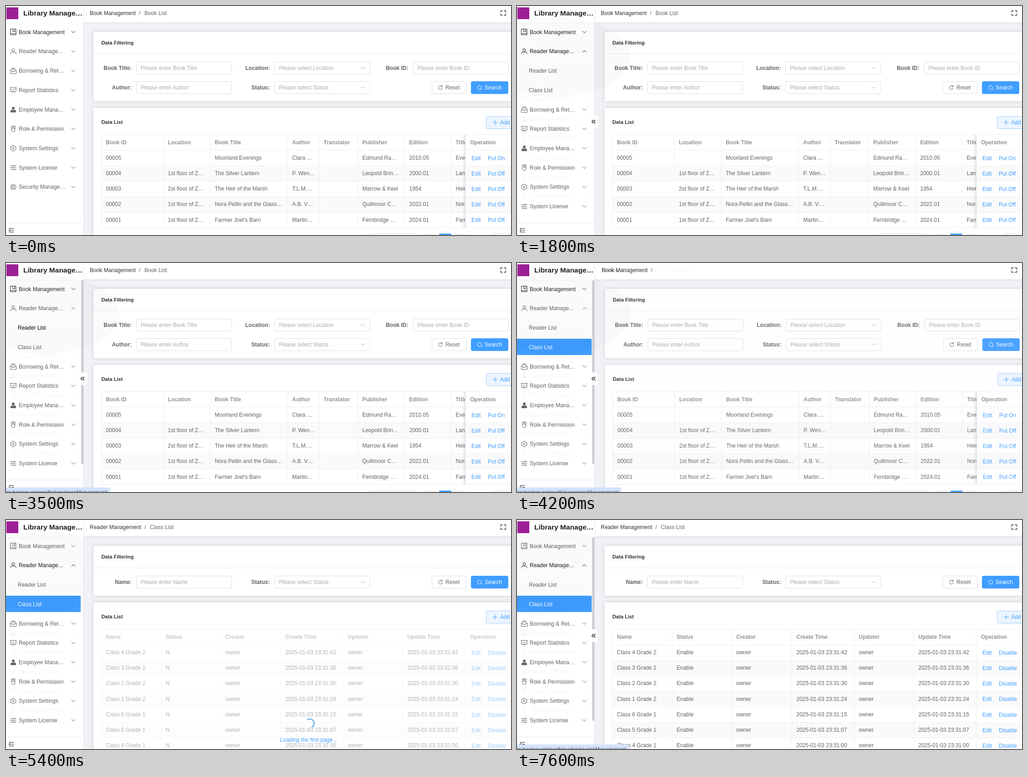
Recreate the animation shown at these times as an HTML page. Size 1109 by 505 pixels, loop 8 s.

```html
<!DOCTYPE html>
<html lang="en">
<head>
<meta charset="utf-8">
<title>Library Management</title>
<style>
html, body { margin: 0; width: 100%; height: 100%; overflow: hidden; background: #f0f2f5; }
#stage { display: block; width: 1109px; height: 505px; font: 12px "Liberation Sans", Arial, sans-serif; }
text { fill: currentColor; white-space: pre; }
.b { font-weight: 700; }
.h { font-weight: 700; font-size: 11.1px; }
.logo { font-weight: 700; font-size: 15.5px; }
.line { fill: none; stroke: currentColor; stroke-linecap: round; stroke-linejoin: round; }
.solid { fill: currentColor; }
.card { fill: #fff; filter: drop-shadow(0 0 4px rgba(0, 0, 0, .14)); }
.url { font: 11px "Open Sans", "Noto Sans", sans-serif; }

/* 1% of the loop is 80 ms */
.step, .move { animation: 8s linear infinite; }
.step { animation-timing-function: step-end; }

.m-book { animation-name: m-book; }
@keyframes m-book { 0% { color: #26272a } 56.25%, 100% { color: #606266 } }
.m-reader { animation-name: m-reader; }
@keyframes m-reader {
  0%, 26.25% { color: #606266 } 13.75%, 56.25%, 100% { color: #1a1b1d } }
.m-list { animation-name: m-list; }
@keyframes m-list { 0%, 46.25%, 100% { color: #606266 } 30% { color: #000 } }
.m-class { animation-name: m-class; }
@keyframes m-class { 0% { color: #606266 } 46.25% { color: #000 } 51.25%, 100% { color: #fff } }
.active { animation-name: active; }
@keyframes active { 0% { opacity: 0 } 51.25%, 100% { opacity: 1 } }

.slide { animation-name: slide; }
@keyframes slide {
  0%, 16.8% { transform: translateY(0); animation-timing-function: ease-in-out }
  21.8%, 100% { transform: translateY(85.44px) } }
.flip { animation-name: flip; }
@keyframes flip {
  0%, 16.8% { transform: rotate(0deg); animation-timing-function: ease-in-out }
  21.8%, 100% { transform: rotate(180deg) } }
.trace { animation-name: trace; }
@keyframes trace { 0% { opacity: 0 } 18.75%, 100% { opacity: .06 } }
.blob { animation-name: blob; }
@keyframes blob { 0% { opacity: 0 } 13.75%, 100% { opacity: 1 } }

.fold { animation-name: fold; }
@keyframes fold {
  0%, 11.2% { opacity: 0 } 11.25%, 59.9% { opacity: 1 } 60% { opacity: .5 }
  61.25%, 87.4% { opacity: 0 } 91.25%, 100% { opacity: 1 } }
.bar { animation-name: bar; }
@keyframes bar {
  0%, 29.5% { opacity: 0 } 32.5%, 59.9% { opacity: 1 } 60% { opacity: .5 }
  61.25%, 87.4% { opacity: 0 } 91.25%, 100% { opacity: 1 } }
.u-reader { animation-name: u-reader; }
@keyframes u-reader { 0%, 43.75% { opacity: 0 } 30%, 95%, 100% { opacity: 1 } }
.u-class { animation-name: u-class; }
@keyframes u-class { 0%, 60%, 95%, 100% { opacity: 0 } 43.75%, 87.5% { opacity: 1 } }

.c-old { animation-name: c-old; }
@keyframes c-old {
  0% { opacity: 1; transform: none } 51.25% { opacity: 1; transform: translateX(1px) }
  52.5% { opacity: 1; transform: translateX(2px) } 56.25%, 100% { opacity: 0; transform: none } }
.c-leaf { animation-name: c-leaf; }
@keyframes c-leaf {
  0% { opacity: 1; transform: none } 51.25% { opacity: .8; transform: translateX(-118px) }
  52.5% { opacity: .5; transform: translateX(-117px) } 56.25%, 100% { opacity: 0; transform: none } }
.c-new { animation-name: c-new; }
@keyframes c-new {
  0% { opacity: 0; transform: translateX(16px) } 52.5% { opacity: .05; transform: translateX(16px) }
  56.25%, 100% { opacity: 1; transform: none } }

.books { animation-name: books; }
@keyframes books {
  0% { opacity: 1; transform: none } 51.25% { opacity: .98; transform: translateX(.4px) }
  52.5% { opacity: .93; transform: translateX(.9px) } 56.25%, 100% { opacity: 0; transform: none } }
.foot { animation-name: foot; }
@keyframes foot { 0%, 65%, 100% { opacity: 0 } 56.25% { opacity: 1 } }
.classes { animation-name: classes; }
@keyframes classes {
  0%, 63.3% { opacity: 0; transform: translateX(-26px); animation-timing-function: ease-in-out }
  67.2%, 100% { opacity: 1; transform: none } }
.mask { animation-name: mask; }
@keyframes mask { 0%, 68.75% { opacity: 1 } 70%, 100% { opacity: 0 } }
.spin { animation-name: spin; }
@keyframes spin { 0%, 62.5% { transform: rotate(-180deg) } 72.5%, 100% { transform: rotate(180deg) } }
.pending { animation-name: pending; }
@keyframes pending { 0% { opacity: 1 } 77.5%, 100% { opacity: 0 } }
.ready { animation-name: ready; }
@keyframes ready { 0% { opacity: 0 } 77.5%, 100% { opacity: 1 } }
</style>
</head>
<body>
<svg id="stage" viewBox="0 0 1109 505"></svg>
<script>
const BLUE = '#409eff', GREY = '#606266', SOFT = '#909399', EDGE = '#ebeef5';

// y is the vertical middle of the text
const text = (x, y, s, color = 'inherit', cls = '', anchor = 'start') =>
  `<text x="${x}" y="${y + 4.3}" class="${cls}" text-anchor="${anchor}" style="color:${color}">${s}</text>`;
const rect = (x, y, w, h, fill, extra = '') =>
  `<rect x="${x}" y="${y}" width="${w}" height="${h}" fill="${fill}" ${extra}/>`;
const group = (cls, body, extra = '') => `<g class="${cls}" ${extra}>${body}</g>`;
const at = (x, y, body) => group('', body, `transform="translate(${x} ${y})"`);
const path = (d, color = 'inherit', width = 1, cls = '') =>
  `<path class="line ${cls}" d="${d}" style="color:${color}" stroke-width="${width}"/>`;
const hline = (x, y, w, color = EDGE) => rect(x, y, w, 1, color);
const vline = (x, y, h, color = EDGE) => rect(x, y, 1, h, color);
const disc = (r, x = 0, y = 0) => `M${x - r} ${y}a${r} ${r} 0 1 0 ${2 * r} 0a${r} ${r} 0 1 0 ${-2 * r} 0`;
const DOWN = 'M-4-2L0 2L4-2';

// ---- sidebar ----
const MENU = [
  ['Book Management', 'M-6-6.5H6V6H-6ZM-6 3.5H6M-1-6.5V0L1.2-1.8L3.4 0V-6.5'],
  ['Reader Manage…', disc(3, 0, -3) + 'M-6 6V4.5Q-6 1.5-3 1.5H3Q6 1.5 6 4.5V6'],
  ['Borrowing &amp; Ret…', 'M-6.5 6V-1L-4-3.5H4L6.5-1V6ZM-6.5 0H-2.5V2H2.5V0H6.5M-4-5.5H4'],
  ['Report Statistics', 'M-7-5.5H7M-6-5.5V3H6V-5.5M-3 6L-1 3M3 6L1 3M-3 0L-1-2L1-.5L3-3'],
  ['Employee Mana…', disc(2.6, 0, -3) + 'M-5.5 5.5V4Q-5.5 1-3 1H-1L0 3L1 1H3Q5.5 1 5.5 4V5.5Z', 'solid'],
  ['Role &amp; Permission', disc(4, 0, 2.5) + 'M-4 0V-6H4V0M-1.5-6V-2M1.5-6V-2'],
  ['System Settings', 'M-2-6H2L3-4L6-3L5.5 0L6 3L3 4L2 6H-2L-3 4L-6 3L-5.5 0L-6-3L-3-4Z' + disc(2)],
  ['System License', 'M-6-4H6M-6 0H6M-6 4H6M2-5.5v3M-3-1.5v3M2 2.5v3'],
  ['Security Manage…', disc(6) + disc(3) + 'M-4-4L-2-2M4-4L2-2M-4 4L-2 2M4 4L2 2'],
];
const menuY = i => 57.4 + 42.72 * i;
const item = (i, cls = '', arrow = '') => {
  const [name, icon, look] = MENU[i], y = menuY(i);
  return group(cls, at(16, y, path(icon, 'inherit', 1, look)) + text(28, y, name)
    + at(148, y, path(DOWN, 'inherit', 1, arrow)), `style="color:${GREY}"`);
};
const items = from => MENU.map((_, i) => i >= from ? item(i) : '').join('');
const blob = '<ellipse class="step blob" cx="84" cy="113" rx="165" ry="88" fill="#000" fill-opacity=".018"/>';

const sidebar = '<svg width="171" height="505">'
  + rect(0, 0, 170, 505, '#fff') + vline(170, 0, 505, '#e3e6ed')
  + rect(1, 3, 26, 26, '#9c1f96') + hline(0, 38, 166, '#f3f4f8')
  + text(38, 17, 'Library Manage…', '#1d1e1f', 'logo')
  + item(0, 'step m-book') + item(1, 'step m-reader', 'move flip')
  + group('step active', `<path d="M0 167H162Q164 167 164 169V201Q164 203 162 203H0Z" fill="${BLUE}"/>`)
  + group('step m-list', text(26, menuY(2), 'Reader List'))
  + group('step m-class', text(26, menuY(3), 'Class List'))
  + group('move slide', rect(0, 122, 170, 400, '#fff') + items(2))
  + blob + group('step blob', rect(0, 104, 170, 25, '#fff', 'opacity=".3"'))
  + group('step trace', at(0, 20, items(3)))
  + rect(0, 478, 170, 27, '#fff') + hline(0, 478, 166, '#e3e7f2')
  + path('M7 490.5H17M11.5 494.5H17M7 498.5H17M9 492.5L6.5 494.5L9 496.5', '#222', 1.2)
  + '</svg>';

const overlay = group('move bar', rect(165, 38, 5, 405, '#cdced1', 'rx="2.5"'))
  + group('move fold', rect(158, 241, 20, 28, '#fff', 'rx="3"')
    + path('M167.5 251.5L164.5 255L167.5 258.5M171.5 251.5L168.5 255L171.5 258.5', '#111', 1.3));

const status = (cls, w, url) => group('step ' + cls,
  `<path d="M0 495H${w - 4}Q${w} 495 ${w} 499V505H0Z" fill="#d3e3fd"/>`
  + text(w - 6, 505, url, '#474a50', 'url', 'end'));

// ---- top bar ----
const header = rect(171, 0, 938, 37, '#fff') + hline(171, 36, 938, '#dfe3ea')
  + rect(171, 37, 938, 3, '#000', 'opacity=".025"')
  + group('step c-old', text(184, 16, 'Book Management', '#303133') + text(292, 16, '/', GREY))
  + group('step c-leaf', text(304, 16, 'Book List', GREY))
  + group('step c-new', text(184, 16, 'Reader Management', '#303133')
    + text(304, 16, '/', GREY) + text(316, 16, 'Class List', GREY))
  + path('M1086.5 14V10.5H1090M1094 10.5H1097.5V14M1097.5 17.5V20.5H1094M1090 20.5H1086.5V17.5', '#333', 1.3);

// ---- pages ----
const box = (x, y, w, fill = '#fff', stroke = '#dcdfe6') =>
  rect(x + .5, y + .5, w - 1, 27, fill, `rx="3" stroke="${stroke}"`);
const field = (x, y, label, hint, select) => text(x - 10, y + 14, label + ':', GREY, 'b', 'end')
  + box(x, y, 210) + text(x + 10, y + 14, hint, '#a8abb2')
  + (select ? at(x + 194, y + 14, path(DOWN, '#a8abb2')) : '');
const buttons = y => box(935, y, 76) + at(954, y + 14, path('M3.5-2.5A4.3 4.3 0 1 0 4.3 0M3.8-5V-2.3H1', GREY))
  + text(965, y + 14, 'Reset', GREY)
  + box(1021, y, 82, BLUE, BLUE) + at(1040, y + 14, path(disc(4.3) + 'M3.2 3.2L5 5', '#fff'))
  + text(1051, y + 14, 'Search', '#fff');
const cards = end => rect(192, 57, 940, end - 57, '#fff', 'rx="3" class="card"')
  + text(209.5, 81, 'Data Filtering', '#303133', 'h') + hline(192, 105, 920)
  + rect(192, end + 15, 940, 400, '#fff', 'rx="3" class="card"')
  + text(209.5, end + 46, 'Data List', '#303133', 'h')
  + box(1054, end + 33, 80, '#ecf5ff', '#a0cfff')
  + path(`M1069 ${end + 47}H1079M1074 ${end + 42}V${end + 52}`, BLUE)
  + text(1085, end + 47, 'Add', BLUE);

function table(top, cols, heads, rows, cell, ops) {
  const step = 34.2, last = 1008, height = step * (rows.length + 1);
  const mid = r => top + 16.7 + step * (r + 1);
  let out = rows.map((_, r) => r % 2 ? rect(209, top + step * (r + 1), 900, step, '#fafafa') : '').join('');
  for (let r = 0; r <= rows.length + 1; r++) out += hline(209, Math.round(top + step * r - .4), 900);
  out += cols.map(x => vline(x, top, height)).join('');
  out += heads.map((s, c) => text(cols[c] + 10.5, top + 16.7, s, SOFT, 'b')).join('');
  rows.forEach((row, r) => row.forEach((s, c) => out += cell(cols[c] + 10.5, mid(r), s, c)));
  out += rect(last + 1, top + 1, 100, step - 2, '#fff') + text(1019, top + 16.7, 'Operation', SOFT, 'b');
  rows.forEach((_, r) => {
    out += rect(last + 1, mid(r) - 16, 100, step - 1.5, r % 2 ? '#fafafa' : '#fff')
      + text(1022, mid(r) + .8, 'Edit', BLUE) + text(1058, mid(r) + .8, ops[r] || ops[0], BLUE);
  });
  return out + vline(last, top, height);
}

const BOOKS = [
  ['00005', '', 'Moorland Evenings', 'Clara …', '', 'Edmund Ra…', '2010.05', 'Evenings'],
  ['00004', '1st floor of Z…', 'The Silver Lantern', 'P. Wen…', '', 'Leopold Brin…', '2000.01', 'Lantern'],
  ['00003', '2st floor of Z…', 'The Heir of the Marsh', 'T.L.M.…', '', 'Marrow &amp; Keel', '1954', 'Heir'],
  ['00002', '1st floor of Z…', 'Nora Pellin and the Glass…', 'A.B. V…', '', 'Quillmoor C…', '2022.01', 'Nora'],
  ['00001', '1st floor of Z…', "Farmer Joel's Barn", 'Martin…', '', 'Fernbridge …', '2024.01', 'Farmer'],
];
const plain = (x, y, s) => text(x, y, s, GREY);
const shade = '<linearGradient id="shade"><stop stop-opacity="0"/><stop offset="1" stop-opacity=".09"/></linearGradient>';

const books = cards(210)
  + field(286, 123, 'Book Title', 'Please enter Book Title')
  + field(589.5, 123, 'Location', 'Please select Location', true)
  + field(893.5, 123, 'Book ID', 'Please enter Book ID')
  + field(286, 166, 'Author', 'Please enter Author')
  + field(589.5, 166, 'Status', 'Please select Status', true)
  + buttons(166)
  + table(283.5, [209, 345, 448, 618, 687, 772, 875, 977],
    ['Book ID', 'Location', 'Book Title', 'Author', 'Translator', 'Publisher', 'Edition', 'Title'],
    BOOKS, plain, ['Put On', 'Put Off', 'Put Off', 'Put Off', 'Put Off'])
  + rect(1001, 284, 8, 205, 'url(#shade)')
  + box(794, 502, 109) + rect(917, 502, 27, 9, '#f4f4f5') + rect(951, 502, 27, 9, BLUE, 'rx="2"')
  + rect(985, 502, 27, 9, '#f4f4f5') + box(1066, 502, 80)
  + blob;

const CLASSES = [[4, 2, '31:42'], [3, 2, '31:36'], [2, 2, '31:30'], [1, 2, '31:24'],
  [6, 1, '31:15'], [5, 1, '31:07'], [4, 1, '31:00']].map(([n, grade, time]) => {
  const stamp = '2025-01-03 23:' + time;
  return [`Class ${n} Grade ${grade}`, 'Enable', 'owner', stamp, 'owner', stamp];
});
const classCell = (x, y, s, c) => c === 1
  ? group('step pending', plain(x, y, 'N')) + group('step ready', plain(x, y, s))
  : plain(x, y, s);

const classes = cards(167)
  + field(286, 123, 'Name', 'Please enter Name')
  + field(589.5, 123, 'Status', 'Please select Status', true)
  + buttons(123)
  + table(240.8, [209, 340, 471, 603, 740, 871],
    ['Name', 'Status', 'Creator', 'Create Time', 'Updater', 'Update Time'],
    CLASSES, classCell, ['Disable'])
  + group('move mask', rect(209, 241, 900, 264, '#fff', 'opacity=".5"')
    + at(668, 448, path('M-6-8A9.5 9.5 0 0 1 4 8.5', BLUE, 2, 'move spin'))
    + text(664.5, 484.5, 'Loading the first page...', BLUE, '', 'middle'));

const footer = text(516, 497, 'Copyright © 2024-present', GREY) + text(660, 497, 'Library Management System', GREY);

document.getElementById('stage').innerHTML = shade + rect(0, 0, 1109, 505, '#f0f2f5')
  + group('step foot', footer) + group('step books', books) + group('move classes', classes)
  + header + sidebar + overlay
  + status('u-reader', 246, 'www.bookes.online/#/reader/readerManagement')
  + status('u-class', 229, 'www.bookes.online/#/class/classManagement');
</script>
</body>
</html>
```
